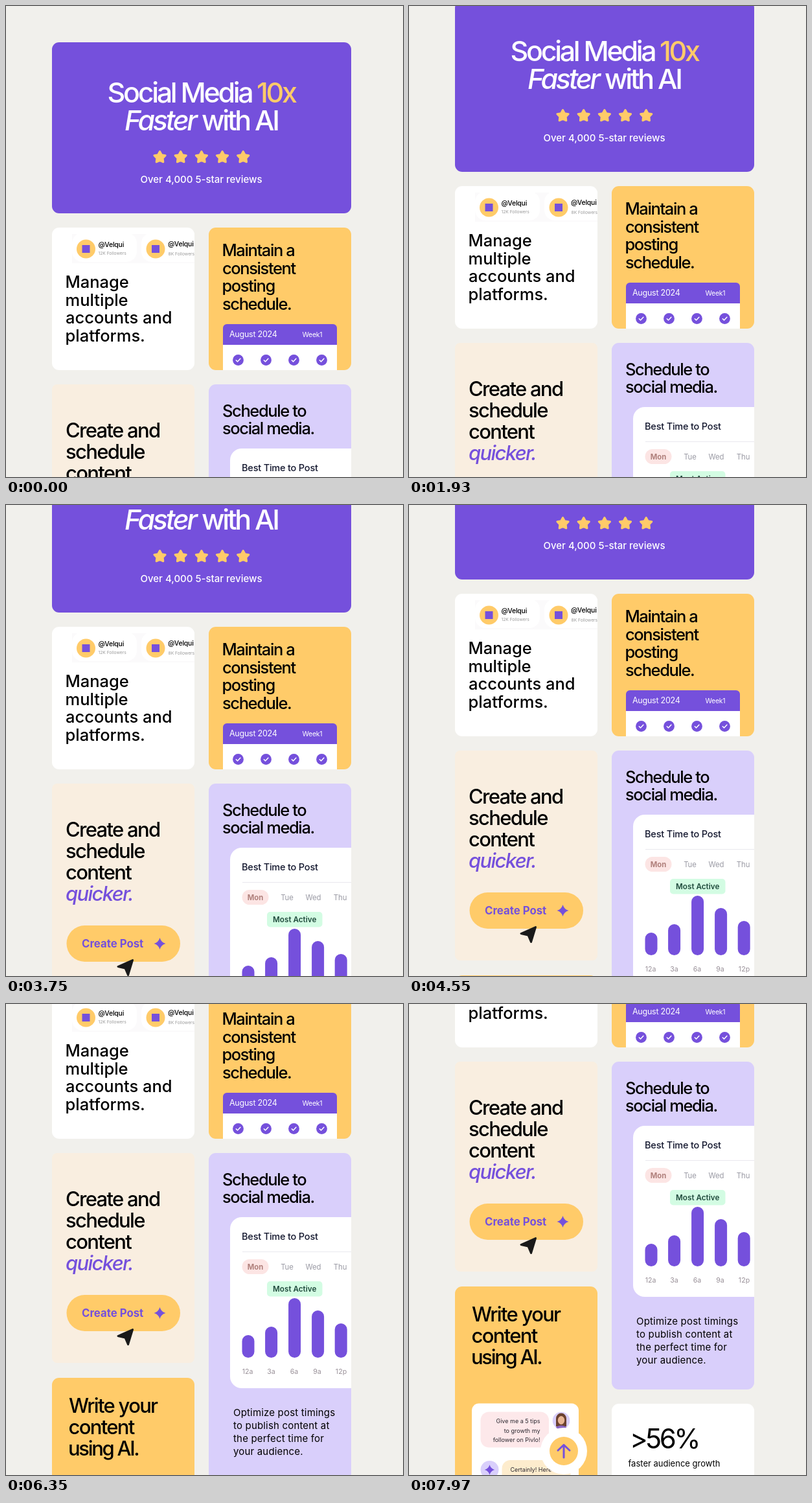
Write an HTML page that moves like this. It is 613 px wide and 727 px high and loops after 8 s.

```html
<!DOCTYPE html>
<html lang="en">
<head>
<meta charset="utf-8">
<title>Social media tools</title>
<style>
  :root {
    --purple: #7550dc;
    --yellow: #ffcb69;
    --lavender: #d9cffb;
    --beige: #f9eee0;
  }
  html, body {
    margin: 0;
    width: 100%;
    height: 100%;
    overflow: hidden;
    background: #f1f0ec;
  }
  body { position: relative; }

  .page {
    position: absolute;
    left: 0;
    top: 0;
    display: block;
    font-family: Inter, "Open Sans", sans-serif;
    font-weight: 500;
    font-optical-sizing: none;
    animation: scroll 8s infinite;
  }
  /* The page scrolls in discrete jumps, about five per second. */
  @keyframes scroll {
    0%     { top: 0; animation-timing-function: step-end; }
    3.6%   { top: 0; animation-timing-function: steps(5); }
    16.6%  { top: -47px; animation-timing-function: steps(7); }
    34.2%  { top: -108px; animation-timing-function: steps(5); }
    46.7%  { top: -154px; animation-timing-function: steps(4); }
    56.85% { top: -205px; animation-timing-function: steps(5); }
    69.35% { top: -309px; animation-timing-function: steps(7); }
    86.95% { top: -415px; animation-timing-function: steps(5); }
    99.6%, 100% { top: -495px; }
  }

  .purple { fill: var(--purple); }
  .yellow { fill: var(--yellow); }
  .lavender { fill: var(--lavender); }
  .beige { fill: var(--beige); }
  .white { fill: #fff; }
  .italic { font-style: italic; }
  .mid { text-anchor: middle; }
  .end { text-anchor: end; }
  .line { fill: none; stroke-linecap: round; stroke-linejoin: round; }

  .hero { font-size: 43px; letter-spacing: -3.3px; }
  .large { font-size: 31px; letter-spacing: -1.7px; }
  .medium { font-size: 25.5px; letter-spacing: -1.4px; }
  .loose { letter-spacing: 0; }
  .tight { letter-spacing: -2.3px; }
  .body { font-size: 15px; font-weight: 400; letter-spacing: .18px; }
  .handle { font-size: 10.5px; letter-spacing: -.2px; }
  .count { font-size: 6.7px; font-weight: 400; fill: #999; }
  .day { font-size: 11.3px; font-weight: 400; fill: #9a9aa4; }
  .day .active { font-weight: 700; fill: #b0807c; }
  .hour { font-size: 10.6px; font-weight: 400; fill: #999098; }
  .chat { font-size: 9px; font-weight: 400; fill: #2c2830; }
  .bars { stroke: var(--purple); stroke-width: 19; stroke-linecap: round; }
</style>
</head>
<body>
<svg class="page" width="613" height="1260" viewBox="0 0 613 1260">
  <defs>
    <path id="star" d="M0-9 2.8-3.9 8.6-2.8 4.6 1.5 5.3 7.3 0 4.8-5.3 7.3-4.6 1.5-8.6-2.8-2.8-3.9Z"
      fill="#ffcb69" stroke="#ffcb69" stroke-width="3" stroke-linejoin="round"/>
    <path id="spark" class="purple" d="M0-9Q2-2 9 0Q2 2 0 9Q-2 2-9 0Q-2-2 0-9Z"/>
    <g id="check">
      <circle class="purple" r="8.4"/>
      <path class="line" d="M-3.2.2-1 2.5 3.4-2.3" stroke="#fff" stroke-width="1.5"/>
    </g>
    <g id="badge">
      <circle class="yellow" r="14.5"/>
      <rect class="purple" x="-6" y="-6" width="12" height="12"/>
    </g>
    <clipPath id="accounts"><rect x="71" y="342" width="220" height="220" rx="11"/></clipPath>
    <clipPath id="timing"><rect x="313" y="584" width="220" height="506" rx="11"/></clipPath>
    <clipPath id="avatar"><circle r="13.5"/></clipPath>
  </defs>

  <!-- Hero -->
  <rect class="purple" x="71" y="56" width="462" height="264" rx="11"/>
  <g class="hero white">
    <text x="156.5" y="149">Social Media</text>
    <text class="yellow" x="387" y="149">10x</text>
    <text class="italic" x="183" y="192">Faster</text>
    <text x="302" y="192">with AI</text>
  </g>
  <use href="#star" x="237.5" y="233.5"/>
  <use href="#star" x="269.7" y="233.5"/>
  <use href="#star" x="301.9" y="233.5"/>
  <use href="#star" x="334" y="233.5"/>
  <use href="#star" x="366.2" y="233.5"/>
  <text class="white mid" x="301.5" y="273" font-size="15">Over 4,000 5-star reviews</text>

  <!-- Accounts -->
  <g clip-path="url(#accounts)">
    <rect class="white" x="71" y="342" width="220" height="220"/>
    <rect x="102" y="352" width="189" height="45" fill="#fbfafb"/>
    <rect class="white" x="102" y="350" width="100" height="45" rx="16"/>
    <rect class="white" x="209" y="350" width="100" height="45" rx="16"/>
    <use href="#badge" x="123.5" y="375"/>
    <text class="handle" x="142.5" y="372">@Velqui</text>
    <text class="count" x="142.5" y="383.5">12K Followers</text>
    <use href="#badge" x="231" y="375"/>
    <text class="handle" x="250" y="371">@Velqui</text>
    <text class="count" x="250.5" y="384.5">8K Followers</text>
    <text class="medium loose" y="435">
      <tspan x="91.5">Manage</tspan><tspan x="91.5" dy="27.5">multiple</tspan><tspan x="92" dy="27.5">accounts and</tspan><tspan x="91.5" dy="27.5">platforms.</tspan>
    </text>
  </g>

  <!-- Calendar -->
  <rect class="yellow" x="313" y="342" width="220" height="220" rx="11"/>
  <text class="medium" y="386">
    <tspan x="333.5">Maintain a</tspan><tspan x="334" dy="27.5">consistent</tspan><tspan x="333.5" dy="27.5">posting</tspan><tspan x="334" dy="27.5">schedule.</tspan>
  </text>
  <rect class="white" x="335" y="515" width="176" height="47"/>
  <path class="purple" d="M335 523V497a6 6 0 0 1 6-6H505a6 6 0 0 1 6 6V523Z"/>
  <g class="white" font-weight="400" letter-spacing="-.25">
    <text x="345" y="511" font-size="12.5">August 2024</text>
    <text x="457.5" y="510.5" font-size="10.5">Week1</text>
  </g>
  <use href="#check" x="358.5" y="546.5"/>
  <use href="#check" x="401.5" y="546.5"/>
  <use href="#check" x="444.5" y="546.5"/>
  <use href="#check" x="487.5" y="546.5"/>

  <!-- Create -->
  <rect class="beige" x="71" y="584" width="220" height="324" rx="8"/>
  <text class="large" y="666">
    <tspan x="92">Create and</tspan><tspan x="92" dy="33">schedule</tspan><tspan x="92" dy="33">content</tspan><tspan class="italic purple" x="92" dy="33">quicker.</tspan>
  </text>
  <rect class="yellow" x="93.5" y="803" width="175.5" height="56" rx="28"/>
  <text class="purple" x="117" y="837" font-size="16.8" font-weight="700">Create Post</text>
  <use href="#spark" x="237.5" y="831"/>
  <path d="M195.5 856.5 173 866.5 184 869 188.5 879.5Z" fill="#1a1a1a" stroke="#1a1a1a" stroke-width="3" stroke-linejoin="round"/>

  <!-- Timing -->
  <g clip-path="url(#timing)">
    <rect class="lavender" x="313" y="584" width="220" height="506"/>
    <text class="medium" y="634">
      <tspan x="334">Schedule to</tspan><tspan x="334" dy="27">social media.</tspan>
    </text>
    <rect class="white" x="346" y="683" width="220" height="264" rx="18"/>
    <text x="364" y="718" font-size="14.5" letter-spacing="-.2" fill="#14182f">Best Time to Post</text>
    <path d="M365 736.5H533" stroke="#e9e8ee"/>
    <rect x="364.5" y="748" width="41" height="23" rx="11.5" fill="#fce5e4"/>
    <g class="day mid">
      <text class="active" x="385" y="764">Mon</text>
      <text x="434" y="764">Tue</text>
      <text x="474.5" y="764">Wed</text>
      <text x="516" y="764">Thu</text>
    </g>
    <rect x="403" y="782" width="85.5" height="23.5" rx="5" fill="#d3fce3"/>
    <text class="mid" x="445.7" y="798" font-size="11.7" font-weight="600" fill="#1f4a3c">Most Active</text>
    <path class="bars" d="M374 874.5V890.5M409.6 861.5V890.5M445.6 817.5V890.5M481.6 836.5V890.5M517.2 856.5V890.5"/>
    <g class="hour mid">
      <text x="373" y="925">12a</text>
      <text x="409.5" y="925">3a</text>
      <text x="445" y="925">6a</text>
      <text x="480.5" y="925">9a</text>
      <text x="517.5" y="925">12p</text>
    </g>
    <text class="body" y="990">
      <tspan x="351">Optimize post timings</tspan><tspan x="351" dy="20">to publish content at</tspan><tspan x="351" dy="20">the perfect time for</tspan><tspan x="351" dy="20">your audience.</tspan>
    </text>
  </g>

  <!-- Writing -->
  <rect class="yellow" x="71" y="931" width="220" height="400" rx="11"/>
  <text class="large" y="985">
    <tspan x="97">Write your</tspan><tspan x="96.5" dy="33">content</tspan><tspan class="tight" x="96" dy="33">using AI.</tspan>
  </text>
  <rect class="white" x="97" y="1111.5" width="165" height="200" rx="11"/>
  <rect x="110.5" y="1124.5" width="105.5" height="55" rx="13" fill="#fde8ea"/>
  <text class="chat end" y="1142">
    <tspan x="202.5">Give me a 5 tips</tspan><tspan x="202.5" dy="14.5">to growth my</tspan><tspan x="202.5" dy="14.5">follower on Pivlo!</tspan>
  </text>
  <g transform="translate(235 1138)" clip-path="url(#avatar)">
    <circle class="lavender" r="13.5"/>
    <path d="M-8 9V-3a8 8.5 0 0 1 16 0V9Z" fill="#6b4230"/>
    <ellipse cy="-.5" rx="5.2" ry="6.5" fill="#e9b795"/>
    <ellipse cy="13" rx="9" ry="5.5" fill="#8b67c4"/>
  </g>
  <circle class="lavender" cx="124.5" cy="1214" r="14"/>
  <use href="#spark" transform="translate(124.5 1214) scale(.85)"/>
  <rect x="143.5" y="1199" width="106" height="50" rx="13" fill="#fdeccd"/>
  <text class="chat" x="156.5" y="1217">Certainly! Here</text>
  <circle class="white" cx="239" cy="1185" r="36"/>
  <circle class="yellow" cx="239" cy="1185" r="22"/>
  <path class="line" d="M239 1195V1176M230 1184 239 1175.5 248 1184" stroke="#7550dc" stroke-width="3"/>

  <!-- Growth -->
  <rect class="white" x="313" y="1112" width="220" height="220" rx="11"/>
  <text x="341" y="1181" font-size="42" font-weight="400" letter-spacing="-3.5">&gt;56%</text>
  <text x="338.5" y="1209" font-size="13" font-weight="400">faster audience growth</text>
</svg>
</body>
</html>
```
